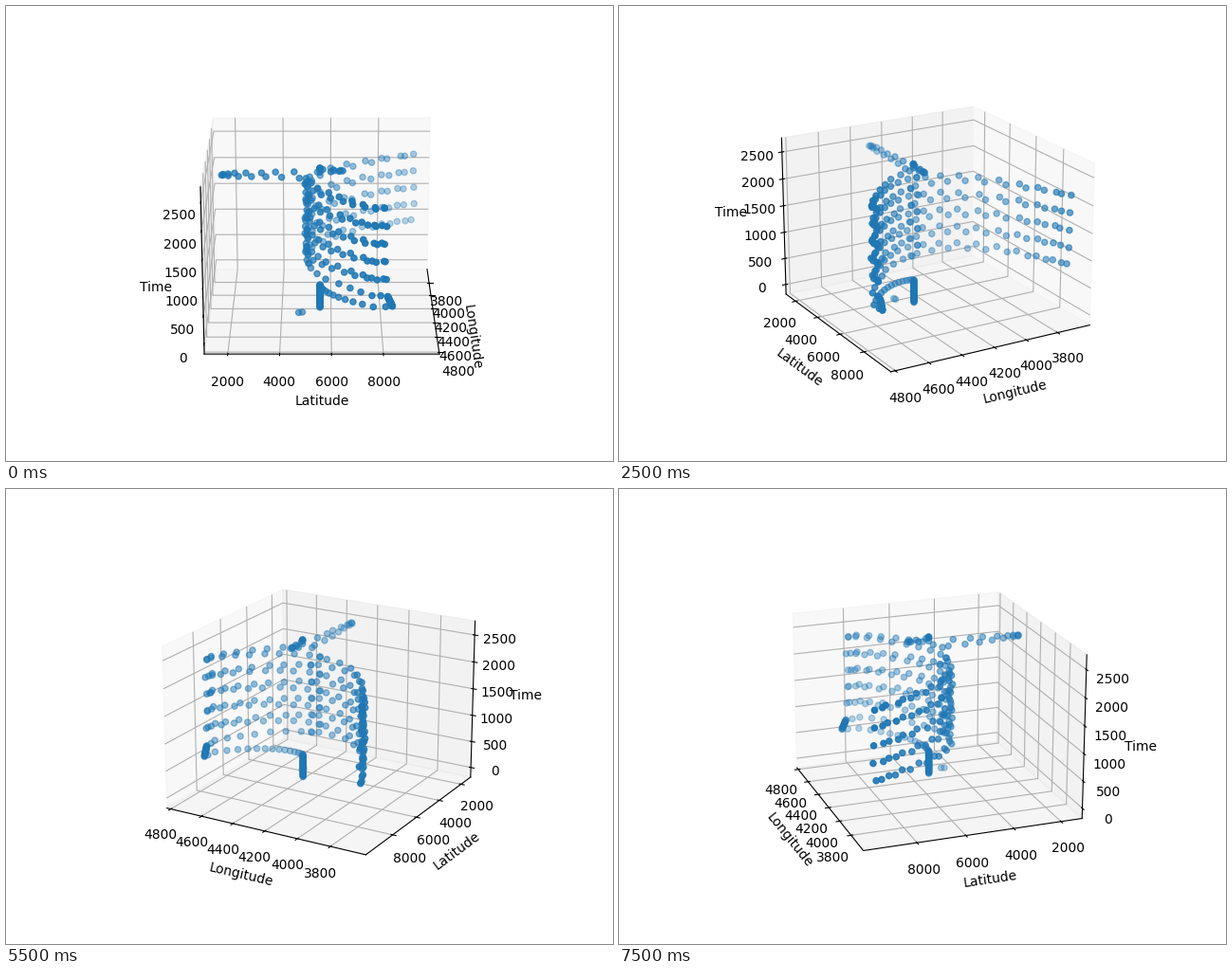
These frames come from a looping animation (640 px wide and 480 px high, 8000 ms). A matplotlib script:

```python
import numpy as np
import matplotlib.pyplot as plt
from matplotlib.animation import FuncAnimation

STEP, T_END = 8, 2570           # sample spacing and length of the track
LEAVE, ARRIVE = 440, 556        # from the dock to the near corner
START, LEG, LEGS = 738, 156.1, 10
TRIP, BACK = 2370, 2496         # excursion to the lowest latitude

DOCK = 4335, 5550               # longitude, latitude
FAR, NEAR, WALL = 3669, 4790, 4738
CORNER = 8350
STOP = 4318, 5245

# Ten degrees a frame, with one position left out.
AZIMUTHS = [a for a in range(0, 170, 10) if a != 40]


def padded(lo, hi):
    """Data range plus 5 % margins and a further 1/48 on each side."""
    pad = (hi - lo) * (1.1 * 25 / 24 - 1) / 2
    return lo - pad, hi + pad


def bowl(lon):
    d = lon - 4239
    return np.where(d > 0, 5000 + 3160 * (np.abs(d) / 551) ** 2,
                    5000 + 4550 * (np.abs(d) / 569) ** 2.2)


def approach(t):
    """Rest at the dock, curve out to the near corner, then drift back."""
    q = np.clip((t - LEAVE) / (ARRIVE - LEAVE), 0, 1) ** 1.4
    drift = np.clip((t - ARRIVE) / (START - ARRIVE), 0, 1)
    lon = DOCK[0] + 465 * q
    lat = DOCK[1] + (CORNER - DOCK[1]) * q ** 2 - 190 * drift
    early = t < 2 * STEP
    return (np.where(early, 4398, np.minimum(lon, WALL)),
            np.where(early, 4700 + 18 * t, lat))


def shuttle(t):
    """Sweep along the bowl, slow at both ends, with a short halt midway."""
    leg, p = np.divmod((t - START) / LEG, 1)
    outward = leg % 2 == 0
    p = 0.4 * p + 0.3 * (1 - np.cos(np.pi * p))
    halt = np.where(outward, 0.423, 0.534)
    p = np.where(p < 0.42, p / 0.42 * halt,
                 np.maximum(halt, 1 - (1 - p) / 0.46 * (1 - halt)))
    lon = NEAR + (FAR - NEAR) * np.where(outward, p, 1 - p)
    return np.minimum(lon, WALL), bowl(lon)


def finish(t):
    """Run to the lowest latitude and back, overshoot, end at the dock."""
    out = np.sin(np.pi * (t - TRIP) / (BACK - TRIP))
    over = np.sin(np.pi * np.clip((t - BACK) / 50, 0, 1))
    lat = np.where(t < BACK, STOP[1] + (1671 - STOP[1]) * out,
                   DOCK[1] + 900 * over)
    return np.where(t < BACK, STOP[0], DOCK[0]), lat


def track():
    rng = np.random.default_rng(4)
    t = np.append(np.arange(0, T_END, STEP), T_END)
    phases = [t < START, t < TRIP]
    lon, lat = (np.select(phases, parts[:2], parts[2])
                for parts in zip(approach(t), shuttle(t), finish(t)))
    moving = (t > START) & (t < BACK)
    lon = lon + moving * rng.uniform(-6, 6, t.size)
    lat = lat + moving * rng.uniform(-60, 60, t.size)
    return lon, lat, t


fig = plt.figure(figsize=(6.4, 4.8), dpi=100)
ax = fig.add_subplot(projection="3d")
ax.scatter(*track())
ax.set(xlim=padded(FAR, 4747), ylim=padded(1671, 9582), zlim=padded(0, T_END),
       xticks=range(3800, 4801, 200), yticks=range(2000, 8001, 2000),
       zticks=range(0, 2501, 500),
       xlabel="Longitude", ylabel="Latitude", zlabel="Time")


def update(i):
    # A hair inside the quadrant keeps the panes on one side at 0 and 90.
    azim = AZIMUTHS[i]
    ax.view_init(elev=20, azim=np.clip(azim, 1e-4, 90 - 1e-4)
                 if azim <= 90 else azim)


anim = FuncAnimation(fig, update, frames=len(AZIMUTHS), interval=500,
                     init_func=lambda: None, repeat_delay=0)
plt.show()
```
